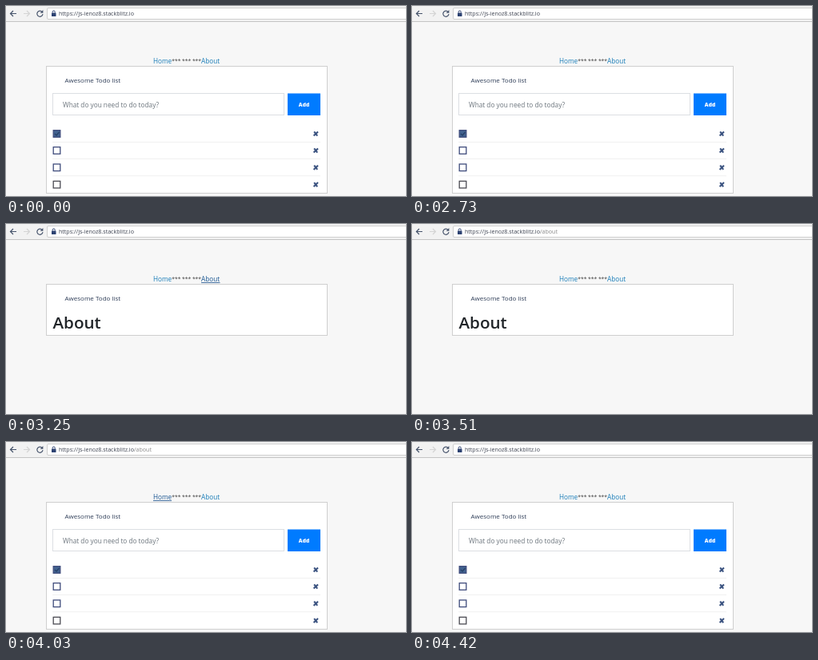
Write an HTML page that moves like this. It is 500 by 238 pixels and loops after 5.46 s.

```html
<!DOCTYPE html>
<html lang="en">
<head>
<meta charset="utf-8">
<title>Todo routing</title>
<style>
  html, body { margin: 0; width: 100%; height: 100%; overflow: hidden; background: #f7f7f7; }
  svg { display: block; width: 500px; height: 238px; font-family: "Open Sans", "Noto Sans", sans-serif; }
  .link { fill: #1a7db8; font-size: 8.2px; }
  .rule { stroke: #174f8c; stroke-width: .8; visibility: hidden; }
  .hover .link { fill: #1c5792; }
  .hover .rule { visibility: visible; }
  .icon { fill: none; stroke: #46536b; stroke-width: 1.2; }
</style>
</head>
<body>
<svg viewBox="0 0 500 238">
  <rect width="500" height="238" fill="#f7f7f7"/>
  <rect width="500" height="20" fill="#f2f2f2"/>
  <path d="M0 19.5H500" stroke="#c4c4c4"/>
  <rect x="51.5" y="2.5" width="460" height="14" rx="1.5" fill="#fff" stroke="#cfcfcf"/>
  <path class="icon" d="M13 9.5H5.5M9 6L5.5 9.5L9 13"/>
  <path class="icon" d="M22 9.5H29.5M26 6L29.5 9.5L26 13" style="stroke:#d4d4d4"/>
  <path class="icon" d="M45.2 7.4A3.6 3.6 0 1 0 46 10.2"/>
  <path d="M46.4 5V8.8H42.6Z" fill="#46536b"/>
  <rect x="57" y="8.5" width="5.5" height="4.5" rx=".5" fill="#2d4272"/>
  <path d="M58.2 8.5V7.4a1.5 1.5 0 0 1 3 0V8.5" fill="none" stroke="#2d4272"/>
  <text x="66" y="12" font-size="7.1" fill="#8a8a8a"><tspan fill="#3c4250">https://js-ienoz8.stackblitz.io</tspan><tspan id="path">/about</tspan></text>

  <g id="home"><text class="link" x="184" y="72">Home</text><path class="rule" d="M184 73.5H207"/></g>
  <text x="207.3" y="71" font-size="6.7" fill="#444">*** *** ***</text>
  <g id="about"><text class="link" x="244" y="72">About</text><path class="rule" d="M244 73.5H267.5"/></g>

  <rect id="card" x="50.5" y="75.5" width="351" height="159" fill="#fff" stroke="#cfcfcf"/>
  <text x="73.5" y="96" font-size="8" fill="#2f3e58">Awesome Todo list</text>

  <g id="todo">
    <rect x="58.5" y="109.5" width="289" height="27" fill="#fff" stroke="#dcdfe3"/>
    <text x="71" y="127" font-size="8.25" fill="#6c757d">What do you need to do today?</text>
    <rect x="352" y="109.5" width="41" height="27.5" fill="#007bff"/>
    <text x="372.5" y="126" font-size="6.6" font-weight="800" fill="#fff" text-anchor="middle">Add</text>
    <g id="rows"></g>
  </g>
  <text id="title" x="58.5" y="131" font-size="20.6" font-weight="600" fill="#212529">About</text>
</svg>
<script>
  const LOOP = 5460;
  // [start ms, page, hovered link, "/about" in the address]
  const steps = [
    [0, 'todo', '', false],
    [1690, 'todo', 'home', false],
    [2730, 'todo', '', false],
    [2860, 'todo', 'about', false],
    [3250, 'about', 'about', false],
    [3380, 'about', 'about', true],
    [3510, 'about', '', true],
    [3640, 'about', 'home', true],
    [4030, 'todo', 'home', true],
    [4160, 'todo', 'home', false],
    [4420, 'todo', '', false]
  ];
  const $ = id => document.getElementById(id);
  const show = (id, on) => $(id).setAttribute('visibility', on ? 'visible' : 'hidden');

  const row = (y, i) => `
    <rect x="59.2" y="${y - 4.3}" width="8.6" height="8.6" stroke-width="1.3"
      fill="${i ? '#fff' : '#41628f'}" stroke="${i < 3 ? '#3f4c7c' : '#4a4a52'}"/>
    ${i ? '' : `<path d="M61 ${y}l2 2 3.5-4" fill="none" stroke="#263f66" stroke-width="1.2"/>`}
    <path d="M385.2 ${y - 2.6}L389.2 ${y + 2.6}M390 ${y - 2.6}L384.6 ${y + 2.6}" stroke="#3b5380" stroke-width="2.1"/>
    ${i < 3 ? `<path d="M58 ${y + 10.5}H393" stroke="#f0f0f0"/>` : ''}`;
  $('rows').innerHTML = [160, 181, 202.3, 223.7].map(row).join('');

  function draw(now) {
    const t = now % LOOP;
    const [, page, hover, routed] = steps.filter(s => s[0] <= t).pop();
    const todo = page === 'todo';
    show('todo', todo);
    show('title', !todo);
    show('path', routed);
    $('card').setAttribute('height', todo ? 159 : 64);
    for (const id of ['home', 'about']) $(id).classList.toggle('hover', hover === id);
  }

  function tick() {
    draw(performance.now());
    requestAnimationFrame(tick);
  }
  tick();
</script>
</body>
</html>
```
